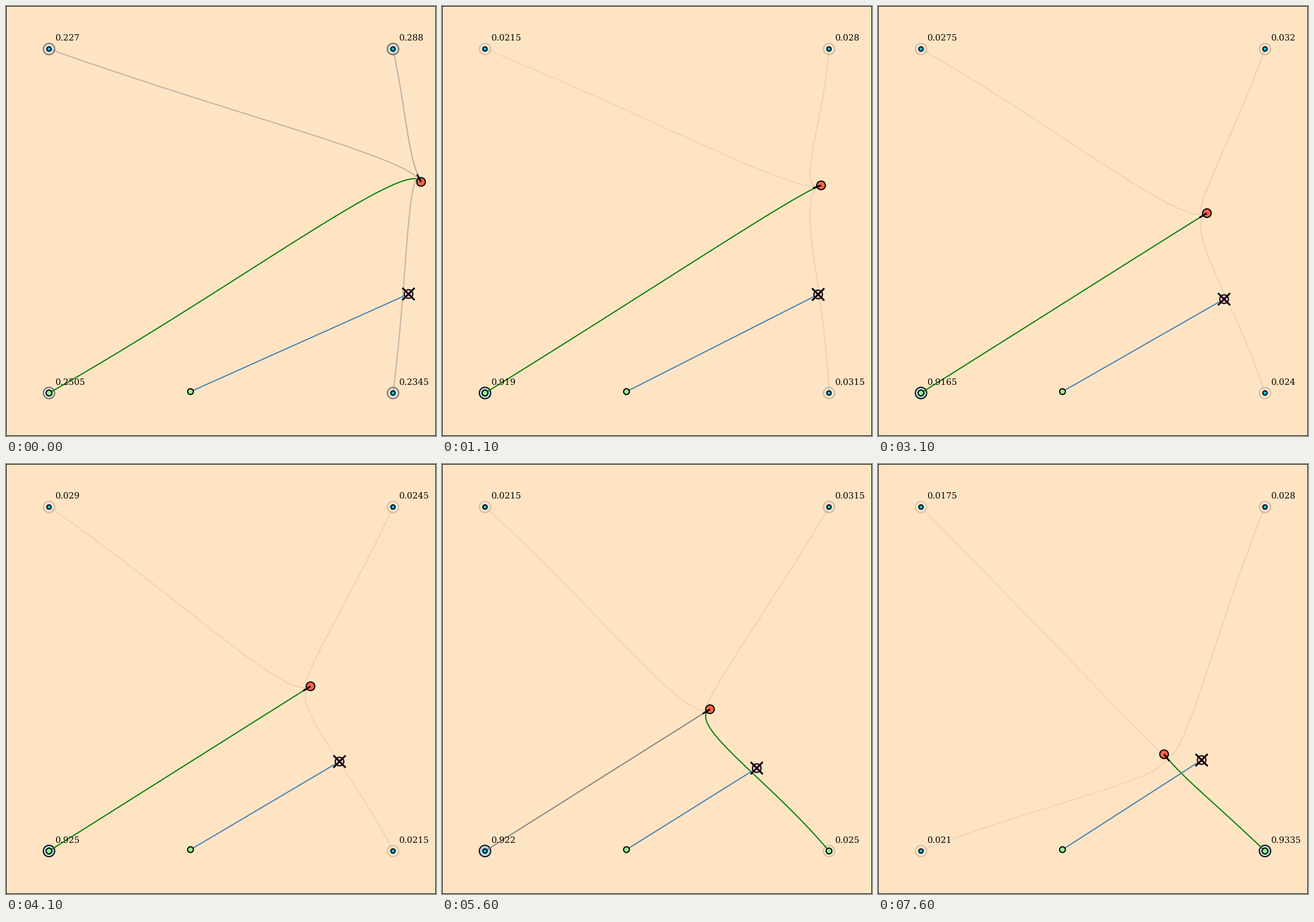
A matplotlib script for the animation above (8000 ms loop, 748x748 px).

```python
import numpy as np
import matplotlib.pyplot as plt
from matplotlib.animation import FuncAnimation
from matplotlib.patches import Circle, Rectangle

SIZE = 748
PX = 0.72  # points per pixel at 100 dpi
FRAMES, HOLD = 80, 5  # frames per loop, frames per step
STEPS = FRAMES // HOLD + 1
SWITCH = 12  # step at which the walker picks its second goal
STRIDE = 25
SAMPLES = 2000
LOW, HIGH = 0.1 * SIZE, 0.9 * SIZE
GOALS = np.array([(x, y) for y in (LOW, HIGH) for x in (LOW, HIGH)])
HELPER = (320.9, 670.8)

plt.rcParams["text.hinting"] = "none"


def goal_at(step):
    return 3 if step >= SWITCH else 2


def unit(angle):
    return np.array([np.cos(angle), np.sin(angle)])


def walk():
    """Halve the heading error each step and slow down while turning."""
    pos, angle = np.array([722.0, 306.0]), np.radians(242)
    poses = []
    for step in range(STEPS):
        poses.append((pos, unit(angle)))
        dx, dy = GOALS[goal_at(step)] - pos
        error = (angle - np.arctan2(dy, dx)) / 2
        angle -= error
        pos = pos + STRIDE * np.cos(error) * unit(angle)
    return poses


def beliefs():
    """Sampled goal shares: even at first, then one step behind the walker."""
    rng = np.random.default_rng(4)
    shares = []
    for step in range(STEPS):
        odds = np.full(4, 0.025 if step else 0.25)
        if step:
            odds[goal_at(step - 1)] = 0.925
        shares.append(rng.multinomial(SAMPLES, odds) / SAMPLES)
    return shares


def meeting(step):
    turns = (0, 5, 12, 14, 16)
    return (np.interp(step, turns, (700.2, 623.8, 547.5, 534, 563)),
            np.interp(step, turns, (501, 502.3, 529, 514.5, 515)))


def route(start, heading, goal):
    """Cubic Bezier that leaves along the heading and ends straight."""
    t = np.linspace(0, 1, 120)[:, None]
    u = 1 - t
    lead = start + 50 * heading
    mid = (start + goal) / 2
    return u**3 * start + 3 * u * u * t * lead + 3 * u * t * t * mid + t**3 * goal


fig = plt.figure(figsize=(SIZE / 100, SIZE / 100), dpi=100, facecolor="bisque")
ax = fig.add_axes([0, 0, 1, 1])
ax.set_xlim(0, SIZE)
ax.set_ylim(SIZE, 0)
ax.axis("off")


def disc(center, radius, color, z):
    return ax.add_patch(Circle(center, radius, fc=color, ec="black",
                               lw=2 * PX, zorder=z))


def stroke(color, width, z):
    return ax.plot([], [], color=color, lw=width * PX, zorder=z,
                   solid_capstyle="butt")[0]


ax.add_patch(Rectangle((0.5, 0.5), SIZE - 1, SIZE - 1, fill=False,
                       ec="black", lw=PX, snap=False, zorder=9))
rings = [disc(g, 9.9, "lightblue", 1) for g in GOALS]
routes = [stroke("gray", 2, 2) for _ in GOALS]
labels = [ax.text(x + 10, y - 14.7, "", family="DejaVu Serif", size=15 * PX,
                  va="baseline", zorder=3) for x, y in GOALS]
dots = [disc(g, 4, "deepskyblue", 4) for g in GOALS]
plan = stroke("steelblue", 2, 5)
disc(HELPER, 5, "lightgreen", 6)
meet = disc((0, 0), 7.5, "pink", 6)
cross = [stroke("black", 3, 7) for _ in range(2)]
walker = disc((0, 0), 7.5, "tomato", 6)
nose = stroke("black", 3, 7)

poses, shares = walk(), beliefs()


def update(frame):
    step = (frame + HOLD - 1) // HOLD
    pos, heading = poses[step]
    walker.center = pos
    nose.set_data(*np.transpose([pos, pos + 15 * heading]))

    mx, my = meeting(step)
    meet.center = mx, my
    plan.set_data([HELPER[0], mx], [HELPER[1], my])
    d = 15 / np.sqrt(2)
    for line, sign in zip(cross, (1, -1)):
        line.set_data([mx - d, mx + d], [my - sign * d, my + sign * d])

    for i, share in enumerate(shares[step]):
        active = i == goal_at(step)
        alpha = np.sqrt(share)
        rings[i].set_alpha(alpha)
        routes[i].set_data(*route(pos, heading, GOALS[i]).T)
        routes[i].set_color("green" if active else "gray")
        routes[i].set_alpha(1 if active else alpha)
        dots[i].set_radius(5 if active else 3.75)
        dots[i].set_facecolor("lightgreen" if active else "deepskyblue")
        labels[i].set_text(f"{share:.4g}")
    return []


anim = FuncAnimation(fig, update, frames=FRAMES, interval=100, repeat=True)
plt.show()
```
